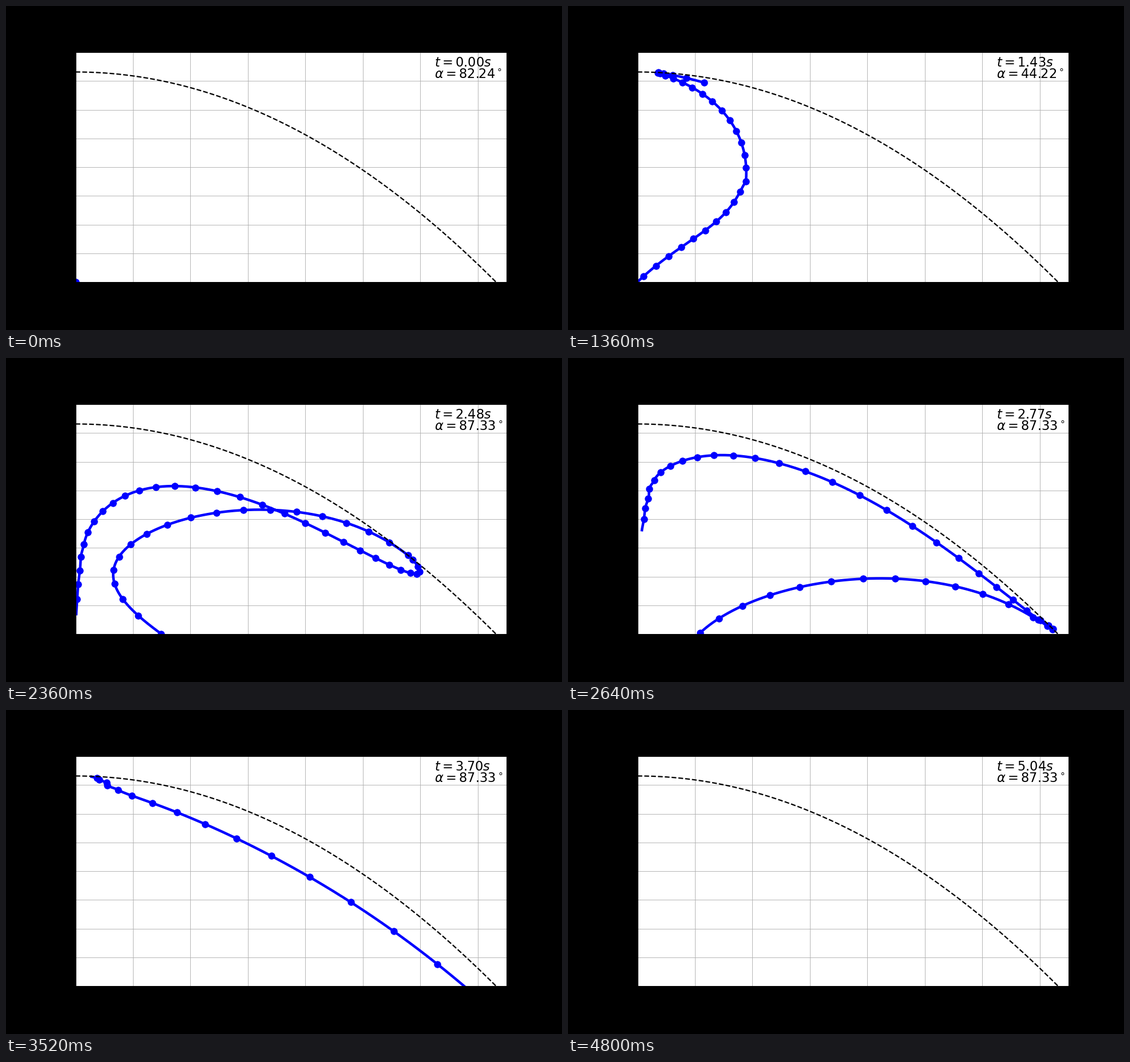
A matplotlib script that plays this animation: 972x567 px, repeating every 4.84 s.

```python
import numpy as np
import matplotlib.pyplot as plt
from matplotlib.animation import FuncAnimation

G = 9.81
REACH = 14.636            # v^2 / g, the longest throw
V = np.sqrt(REACH * G)
FRAMES, STEP = 121, 0.042  # simulated seconds per frame
DROPS, EVERY = 1000, 20    # water samples, one dot per EVERY samples
DOT_STEP = 0.04842         # seconds between two dots


def curve_through(*points):
    k, degrees = zip(*points)
    return np.polynomial.Polynomial.fit(k, degrees, len(points) - 1)


# Key poses (dot number, degrees): the hose is lowered, then raised again.
lower = curve_through((0, 82.24), (2, 85.6), (6, 86.68), (11, 77.84),
                      (16, 62.49), (19, 51.67))
lift = curve_through((19, 51.67), (21, 47.11), (25, 41.76), (29.49, 44.22),
                     (33, 51.92), (36, 61.73), (40, 74.58), (43.37, 82.84),
                     (45, 85.3))


def settle(k):
    """Slow rise with a damped wobble at the top of the swing."""
    j = k - 46
    return 86.11 + 0.44 * j + 0.28 * np.cos(np.pi * j) * np.exp(-0.35 * j)


def nozzle_angle(t):
    k = t / DOT_STEP
    return np.where(k < 19, lower(k), np.where(k < 45, lift(k), settle(k)))


launch = np.arange(DROPS) * DOT_STEP / EVERY
alpha = np.radians(nozzle_angle(launch))
last_dot = launch[DROPS - EVERY]

fig, ax = plt.subplots(figsize=(12, 7), dpi=81, facecolor="black")
fig.subplots_adjust(left=0.125, right=0.9, bottom=0.125, top=0.88)
ax.set_aspect("equal")
ax.set(xlim=(0, 15), ylim=(0, 8), xticks=range(0, 15, 2), yticks=range(9))
ax.tick_params(length=0, labelbottom=False, labelleft=False)
ax.grid(color="#b0b0b0", lw=0.8)

stream, = ax.plot([], [], "-o", color="blue", lw=4, ms=10, markevery=EVERY)
x = np.linspace(0, 15, 1000)
ax.plot(x, REACH / 2 - x**2 / (2 * REACH), "--", color="black", lw=2)
clock = ax.text(12.5, 7.5, "", fontsize=20)
angle = ax.text(12.5, 7.1, "", fontsize=20)


def draw(frame):
    t = frame * STEP
    out = launch <= t
    age, a = t - launch[out], alpha[out]
    stream.set_data(V * np.cos(a) * age, V * np.sin(a) * age - G * age**2 / 2)
    clock.set_text(rf"$t = {t:.2f}s$")
    angle.set_text(rf"$\alpha = {nozzle_angle(min(t, last_dot)):.2f}^\circ$")
    return stream, clock, angle


anim = FuncAnimation(fig, draw, frames=FRAMES, interval=40, repeat=True,
                     repeat_delay=0)
plt.show()
```
